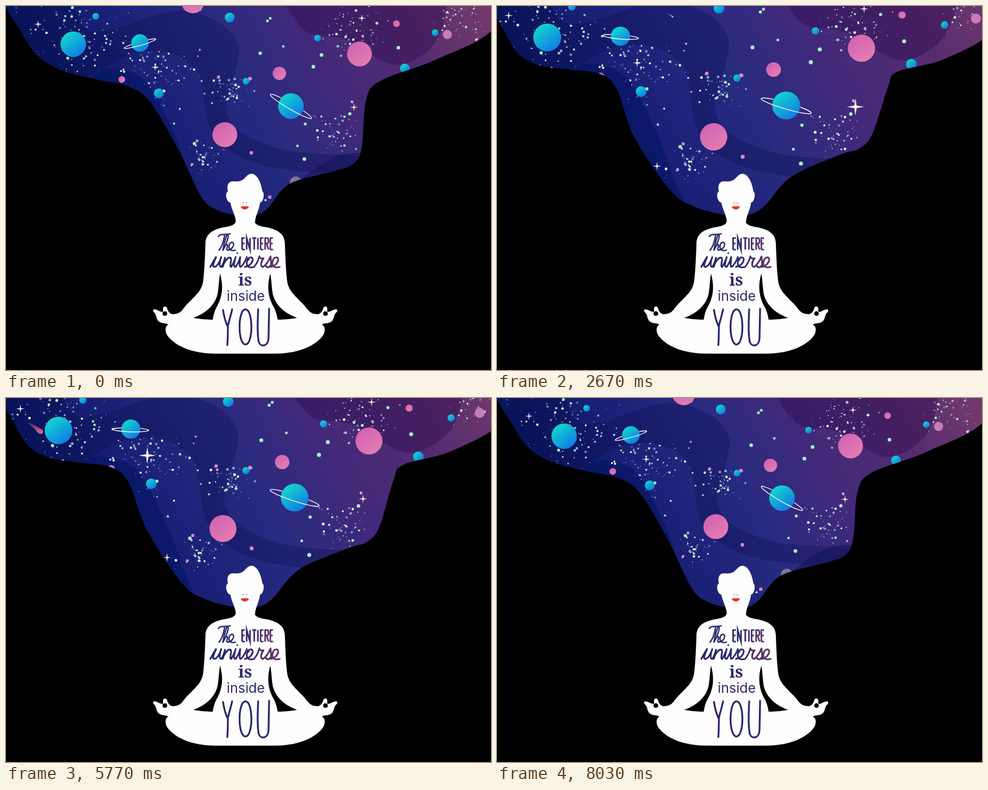
Write an HTML page with a canvas that moves like this. It is 800x600 px and loops after 8060 ms.

```html
<!DOCTYPE html>
<html lang="en">
<head>
<meta charset="utf-8">
<title>Universe inside</title>
<style>
html, body { margin: 0; width: 100%; height: 100%; overflow: hidden; background: #000; }
canvas, svg { position: absolute; left: 0; top: 0; width: 800px; height: 600px; }
</style>
</head>
<body>
<canvas id="sky" width="800" height="600"></canvas>
<svg viewBox="0 0 800 600">
  <defs>
    <g id="half">
      <path fill="#fefefe" d="M397 340H379V354C379 361 370 363 358 365C340 369 329 376 329 392C328 420 327 440 325 455
        C322 474 303 484 291 501C286 507 280 508 274 508C270 507 267 503 266 499C265 494 259 494 259 499L259 504
        C254 505 250 500 245 500C242 500 242 503 244 505C249 509 247 516 252 520C257 524 263 522 268 525
        C262 528 262 536 266 543C280 562 310 573 345 573H397Z"/>
      <path d="M353 441C359 462 357 480 347 497C343 505 342 511 341 517C330 517 318 516 309 514C330 506 344 494 349 475C351 463 351 452 353 441Z"/>
      <circle cx="262" cy="507" r="3.8"/>
    </g>
  </defs>
  <use href="#half"/>
  <use href="#half" transform="translate(789 0) scale(-1 1)"/>
  <path fill="#fefefe" d="M366 306C364 295 366 288 377 289C396 291 394 276 406 276.5C415 278 421 292 423 306
    C427 307 425 324 419 324C418 336 411 345 411 356H379C379 345 372 336 370 324C363 323 361 307 366 306Z"/>
  <path fill="#ee3026" d="M387 331.5Q391 328.5 394 330.5Q397 328.5 401 331.5Q394 339.5 387 331.5Z"/>
  <g fill="#333"><circle cx="391.5" cy="324" r=".8"/><circle cx="396.5" cy="324" r=".8"/></g>
  <g text-anchor="middle" fill="#2a2a70">
    <text x="394.5" y="460.5" font-size="27" font-weight="700" font-family="'Noto Serif', serif">is</text>
    <text x="395.5" y="485.5" font-size="22.5" font-family="Inter, sans-serif">inside</text>
  </g>
</svg>
<canvas id="lettering" width="800" height="600" role="img" aria-label="The entiere universe is inside you"></canvas>
<script>
const context = id => document.getElementById(id).getContext('2d');
const ctx = context('sky'), pen = context('lettering');
const LOOP = 8060, TAU = Math.PI * 2, CX = 398, CY = 175;

let seed = 11;
const rnd = () => (seed = seed * 16807 % 2147483647) / 2147483647;
const spread = () => rnd() + rnd() - 1;
const bell = (v, mid, width) => Math.exp(-(((v - mid) / width) ** 2));

function gradient(x0, y0, x1, y1, ...colors) {
  const g = ctx.createLinearGradient(x0, y0, x1, y1);
  colors.forEach((c, i) => g.addColorStop(i / (colors.length - 1), c));
  return g;
}

// Hand-drawn letters: advance and a stroke that starts on the baseline
const script = {
  T: [12, 'm0-25c2-6 8-2 21-5m-10 2c0 10-1 20-6 28'],
  h: [9, 'c3-6 8-25 5-28s-5 17-5 28c1-8 6-13 7-9s-2 9 2 9'],
  u: [17, 'c2-6 4-13 5-15c-1 7-3 15 1 15s7-8 7-15c-1 8 0 15 4 15'],
  n: [15, 'c2-5 2-11 2-14v14c0-8 4-15 8-14s1 14 5 14'],
  i: [7, 'c2-6 3-10 3-15c0 8-1 15 4 15m-3-21v.1'],
  v: [14, 'c2-5 3-10 3-15c1 6 2 15 4 15s6-10 6-15c0 3 2 4 4 4'],
  e: [14, 'c6-1 10-6 9-11s-8-5-8 3s7 10 13 8'],
  r: [14, 'c3-6 4-10 4-16c1 4 5 3 7 3c-3 6-2 13 3 13'],
  s: [11, 'c4-4 6-10 7-16c1 6 6 11 3 15s-7 0-7-2']
};
const block = {
  E: [7.5, 'v-19h4.5m-4.5 9h4m-4 10h4.5'],
  N: [9, 'v-19l5.5 19v-19'],
  T: [9.5, 'm0-19h7m-3.5 0v19'],
  I: [4.5, 'v-19'],
  R: [8.5, 'v-19h2.5c4 0 4 9 0 9h-2.5m2.5 0l3 10']
};
const tall = {
  Y: [28, 'm1-58c2 14 5 22 8 28m7-29c-3 14-7 24-7 29s0 20-1 30'],
  O: [31, 'm10-59c-13 0-13 58 0 58s13-58 0-58'],
  U: [20, 'm0-59c-1 18-2 40 1 54c4 9 15 7 16-6l1-49']
};

function letter(word, font, x, y, width, scale = 1, slant = 0) {
  const line = new Path2D();
  for (const c of word) {
    const [advance, d] = font[c];
    line.addPath(new Path2D('M0 0' + d), new DOMMatrix([scale, 0, -slant * scale, scale, x, y]));
    x += advance * scale;
  }
  pen.lineWidth = width;
  pen.stroke(line);
}

pen.strokeStyle = gradient(337, 0, 455, 0, '#20286a', '#2c2a6c', '#6b3364');
letter('ENTIERE', block, 389.5, 401.5, 2.6);
pen.lineCap = pen.lineJoin = 'round';
letter('The', script, 347, 402.5, 2.3, .9, .15);
letter('universe', script, 337, 430, 2.8, 1.08, .25);
pen.strokeStyle = '#26286c';
letter('YOU', tall, 357, 559, 3);

// Key points of the hair, clockwise from the neck
const hair = [[382,345], [348,336], [322,314], [282,232], [236,156], [200,132], [150,121], [95,107], [52,82], [22,38], [0,2],
  [-30,-60], [830,-60], [806,35], [710,88], [618,123], [594,155], [587,232], [574,259], [545,271], [468,293], [432,333], [410,345]];

// Both sides billow outwards and lift, most strongly at mid height; the neck stays put
function billow([x, y], grow) {
  const left = x < CX, k = grow * Math.min(1, Math.abs(x - CX) / 60);
  const dx = left ? -14 - 56 * bell(y, 232, 110) : 18 + 47 * bell(y, 165, 80);
  const dy = left ? -26 * bell(x, 215, 130) : -33 * bell(x, 550, 90);
  return [x + dx * k, y + dy * k];
}

// Closed smooth curve through the points
function smooth(points) {
  const n = points.length, path = new Path2D(), at = i => points[(i + n) % n];
  path.moveTo(...at(0));
  for (let i = 0; i < n; i++) {
    const [a, b, c, d] = [at(i - 1), at(i), at(i + 1), at(i + 2)];
    path.bezierCurveTo(b[0] + (c[0] - a[0]) / 6, b[1] + (c[1] - a[1]) / 6,
      c[0] - (d[0] - b[0]) / 6, c[1] - (d[1] - b[1]) / 6, ...c);
  }
  return path;
}

const space = gradient(0, 0, 600, -338, '#07175e', '#1a2076', '#272b80', '#43297a', '#542c70', '#74396c');
const waves = [
  ['rgba(8,10,70,.28)', smooth([[85,-40], [140,42], [290,8], [382,60], [365,180], [450,235], [600,250],
    [590,275], [430,264], [342,212], [312,103], [225,75], [100,125], [-40,100]])],
  ['rgba(40,8,72,.36)', smooth([[470,-40], [490,38], [560,55], [645,97], [714,50], [700,-40]])],
  ['rgba(12,16,84,.45)', smooth([[480,300], [550,246], [620,252], [600,300]])],
  ['rgba(4,20,100,.6)', smooth([[150,110], [223,117], [267,188], [296,262], [310,330], [130,200]])]
];

// Star dust: x, y and reach of each cloud, then larger loose stars
const tints = ['#aeeedd', '#e4f4ee', '#84cfc8', '#f2f2f2', '#7a7cb4', '#a9adcc'];
const dots = [];
for (const [x, y, reach] of [[115,45,100], [252,112,72], [372,140,38], [325,252,38], [543,212,42], [570,45,62], [752,15,52]])
  for (let i = 0; i < reach * 1.25; i++)
    dots.push([x + reach * spread(), y + reach * .85 * spread(), .5 + 1.7 * rnd() ** 2, tints[i % tints.length]]);
for (let i = 0; i < 44; i++)
  dots.push([90 + 620 * rnd(), 270 * rnd(), 1.5 + 1.6 * rnd(), i % 4 ? '#a4eed2' : '#dc8ac4']);

const teal = [[111,63,21], [221,61,14.5], [369,19,8], [148,17,5.5], [252,144,8], [396,124,5.5],
  [470,165,21], [514,53,5.5], [708,44,5.5], [658,103,8]];
const pink = [[361,212,20.5], [451,111,11], [583,79,20.5], [644,29,5.5], [191,121,5.5], [308,-7,19]];
// x, y and moment of the flash or flight
const sparkles = [[587,20,1050], [276,256,1130], [574,167,2670], [246,101,5770], [53,30,6600]];
const comets = [[290,18,2670,2,'159,224,234'], [323,11,4570,5,'150,205,215'], [57,55,5770,8,'206,92,140']];

function disc(x, y, r, fill) {
  ctx.fillStyle = fill;
  ctx.beginPath();
  ctx.arc(x, y, r, 0, TAU);
  ctx.fill();
}

function planet([x, y, r], from, to) {
  disc(x, y, r, gradient(x - r * .6, y - r * .8, x + r * .6, y + r * .8, from, to));
}

function ring(x, y, rx, ry, r, degrees) {
  const hide = Math.acos(r / rx); // the far side passes behind the planet
  ctx.strokeStyle = '#f3eef4';
  ctx.lineWidth = 1.3;
  ctx.beginPath();
  ctx.ellipse(x, y, rx, ry, degrees * TAU / 360, -hide, Math.PI + hide);
  ctx.stroke();
}

function sparkle([x, y, moment], t) {
  const r = 6.5 * (1 + bell(t, moment, 250));
  ctx.fillStyle = '#fff2f0';
  ctx.beginPath();
  for (let i = 0; i < 8; i++) {
    const reach = i % 2 ? r * .2 : r, a = i * TAU / 8;
    ctx.lineTo(x + Math.cos(a) * reach, y + Math.sin(a) * reach);
  }
  ctx.fill();
}

function comet([x, y, moment, width, color], t) {
  const dt = t - moment, length = 8 + 3 * width;
  ctx.save();
  ctx.translate(x + dt * .2, y + dt * .14);
  ctx.rotate(.62);
  ctx.globalAlpha = bell(dt, 0, 180);
  ctx.fillStyle = gradient(-length, 0, 0, 0, `rgba(${color},0)`, `rgb(${color})`);
  ctx.beginPath();
  ctx.moveTo(-length, 0);
  ctx.arc(0, 0, width / 2, -TAU / 4, TAU / 4);
  ctx.fill();
  ctx.restore();
}

function draw(t) {
  const p = Math.max(0, Math.min(t - 40, 8050 - t)) / 4000;
  const grow = (p / .87) ** .85;
  ctx.clearRect(0, 0, 800, 600);
  ctx.save();
  ctx.clip(smooth(hair.map(point => billow(point, grow))));

  ctx.save();
  ctx.translate(CX, CY);
  ctx.scale(1 + .149 * p, 1 + .149 * p);
  ctx.translate(-CX, -CY);
  ctx.fillStyle = space;
  ctx.fillRect(-50, -50, 900, 500);
  waves.forEach(([color, path]) => { ctx.fillStyle = color; ctx.fill(path); });
  dots.forEach(d => disc(...d));
  teal.forEach(b => planet(b, '#12d6cc', '#117ce4'));
  pink.forEach(b => planet(b, '#d164b2', '#e47cb2'));
  disc(728 + 41 * p, 47 - 19 * p, 7.5, '#c87cb8');
  disc(478, 291 + 40 * p, 10, '#87729a');
  ring(470, 165.5, 39.2, 4.8, 21, 30 - 21 * p);
  ring(221, 62, 27, 3, 14.5, -16 + 31 * p);
  sparkles.forEach(s => sparkle(s, t));
  ctx.restore();

  disc(435 + 14 * p, 315 + 45 * p, 3, '#dc7fb8');
  disc(428 + 18 * p, 320 + 45 * p, 1.8, '#e4f4ee');
  comets.forEach(c => comet(c, t));
  ctx.restore();
}

const start = performance.now();
function tick() {
  draw((performance.now() - start) % LOOP);
  requestAnimationFrame(tick);
}
tick();
</script>
</body>
</html>
```
